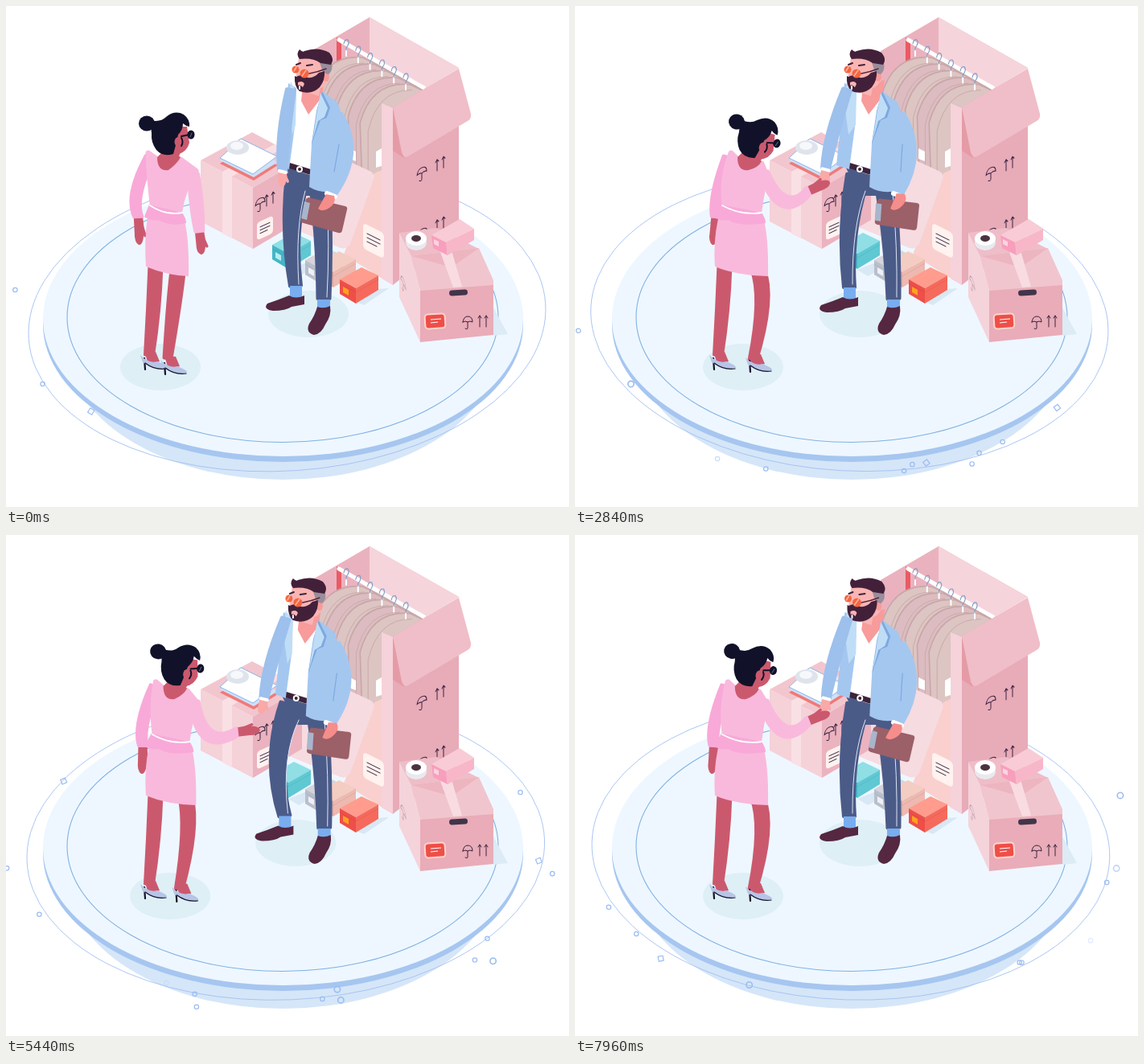
Recreate the animation shown at these times as an HTML page. Size 700 by 623 pixels, loop 8 s.

```html
<!DOCTYPE html>
<html lang="en">
<head>
<meta charset="utf-8">
<title>Handshake</title>
<style>
  html, body { margin: 0; width: 100%; height: 100%; overflow: hidden; background: #fff; }
  svg { display: block; width: 100%; height: 100%; }
  .ink { fill: none; stroke: #3a2440; stroke-width: 1; stroke-linecap: round; stroke-linejoin: round; }
  .thin { fill: none; stroke: #a4c1f2; stroke-width: .9; }
</style>
</head>
<body>
<svg viewBox="0 0 700 623">
  <defs>
    <clipPath id="inside"><path d="M380 56L452 14L563 77L521 103L481 126L467 121V222L380 200Z"/></clipPath>
    <g id="umbrella" class="ink"><path d="M-6 0Q-5-7 0-7Q6-7 6 0Q3-2 0 0Q-3-2-6 0ZM0 0V7Q0 10-3 8"/></g>
    <g id="arrows" class="ink"><path d="M-4 7V-7M-6-4L-4-7L-2-4M4 7V-7M2-4L4-7L6-4"/></g>
  </defs>

  <!-- platform -->
  <ellipse cx="344" cy="420" rx="270" ry="169" fill="#d5e6f8"/>
  <ellipse cx="344.5" cy="396" rx="298.5" ry="171" fill="#a6c6f0"/>
  <ellipse cx="344.5" cy="389" rx="298.5" ry="171" fill="#eef7ff"/>
  <ellipse cx="344" cy="387" rx="268" ry="155.5" fill="none" stroke="#80b1e3" stroke-width="1.1"/>
  <ellipse id="orbit" class="thin" rx="322" ry="186"/>
  <g id="marks" fill="none" stroke="#9bbcf2" stroke-width="1.2"></g>

  <!-- wardrobe box -->
  <path d="M380 56L452 14L563 77L481 126V200H380Z" fill="#eab2be"/>
  <path d="M452 14L563 77L481 126L452 110Z" fill="#f6d4db"/>
  <path d="M411 39L417 42V72L411 75Z" fill="#ea5b64"/>
  <g id="coats" clip-path="url(#inside)"></g>
  <path d="M467 121L481 127V347L420 309L458 208L467 204Z" fill="#f9d0ce"/>
  <path d="M467 121L481 127V347L467 339Z" fill="#f6d2da"/>
  <path d="M481 126L563 78V282L481 347Z" fill="#e8abb8"/>
  <path d="M481 126V180L495 189Z" fill="#e59ba6"/>
  <path d="M481 126L563 78L578 134Q579 140 574 143L500 187Q495 190 492 182Z" fill="#f0bec8"/>
  <path d="M340 232L415 188L452 205Q460 209 457 216L428 296Q424 303 416 301L340 270Z" fill="#f6dbe0"/>
  <g transform="translate(457 292) skewY(27)"><rect x="-13" y="-16" width="26" height="32" rx="5" fill="#fff2ef"/><path class="ink" d="M-8-5H8M-8 0H8M-8 5H4"/></g>
  <path d="M460 181L467 177V199L460 201ZM427 177L435 181V193L427 190Z" fill="#fff"/>
  <use href="#umbrella" transform="translate(517 208) skewY(-25)"/>
  <use href="#arrows" transform="translate(540 196) skewY(-25)"/>
  <use href="#umbrella" transform="translate(518 284) skewY(-25)"/>
  <use href="#arrows" transform="translate(540 271) skewY(-25)"/>

  <!-- left box with folded clothes -->
  <path d="M242 192L306 157L368 190L307 226Z" fill="#f2c6ce"/>
  <path d="M242 192L307 226V302L242 268Z" fill="#f5d1d8"/>
  <path d="M307 226L368 190V266L307 302Z" fill="#ebb3bf"/>
  <path d="M269 206L281 212V289L269 283ZM269 206L334 172L344 177L281 212Z" fill="#f9e0e4"/>
  <path d="M266 196L292 178L338 198L308 217Z" fill="#ef7a78"/>
  <path d="M266 192L292 174L338 194L308 213Z" fill="#cfe0f7"/>
  <path d="M266 189L292 165L337 187L307 209Z" fill="#fff" stroke="#7db0ea" stroke-width=".9"/>
  <ellipse cx="288" cy="176" rx="14" ry="9" fill="#dfe4ec"/><ellipse cx="287" cy="174" rx="8" ry="5" fill="#f7f8fb"/>
  <use href="#umbrella" transform="translate(316 246) skewY(-25)"/>
  <use href="#arrows" transform="translate(328 240) skewY(-25)"/>
  <g transform="translate(322 276) skewY(-25)"><rect x="-10" y="-11" width="20" height="22" rx="4" fill="#fff2ef"/><path class="ink" d="M-6-4H6M-6 0H6M-6 4H3"/></g>

  <!-- shoe boxes -->
  <path d="M351 328L379 317L390 322L364 336ZM438 369L462 352L476 351L445 372Z" fill="#d8e8f4"/>
  <g id="shoeBoxes"></g>

  <!-- right box, tape and parcel -->
  <path d="M606 375L624 408L606 410Z" fill="#dcebf5"/>
  <path d="M489 282L536 276L588 302L504 312Z" fill="#efbdc7"/>
  <path d="M489 282L504 311L515 354V418L489 362Z" fill="#f5d3da"/>
  <path d="M515 353L606 346V409L515 418Z" fill="#e9acb8"/>
  <path d="M504 311L588 301L606 341V347L515 354Z" fill="#f1c5cd"/>
  <path d="M504 311L588 301L554 325Z" fill="#ecb5c0"/>
  <path d="M540 306L554 304L567 349L556 350Z" fill="#f8dce1"/>
  <rect x="551" y="353" width="23" height="7" rx="3.5" fill="#41354a" transform="rotate(-4 562 356)"/>
  <rect x="521" y="383" width="25" height="18" rx="4" fill="#ee4f48" stroke="#ffd4cd" stroke-width="2" transform="rotate(-4 533 392)"/>
  <path d="M528 390L541 389M528 394L537 393" stroke="#fff" stroke-width="1.2"/>
  <use href="#umbrella" x="574" y="393"/><use href="#arrows" x="593" y="392"/>
  <use href="#umbrella" transform="translate(494 346) scale(.55 1) skewY(50)" opacity=".35"/>
  <ellipse cx="510" cy="294" rx="13" ry="10" fill="#e8e9ef"/><ellipse cx="510" cy="289" rx="13" ry="9" fill="#fff"/><ellipse cx="510" cy="289" rx="6" ry="4" fill="#4b3340"/>
  <path d="M529 285L564 265L582 277L547 294Z" fill="#f9cbd6"/>
  <path d="M529 285L547 294L549 310L531 301Z" fill="#f79fbd"/>
  <path d="M547 294L582 277V291L549 310Z" fill="#f7b7c9"/>
  <path d="M532 290L538 293V299L532 296Z" fill="#fbd3df"/>

  <g id="people"></g>
</svg>
<script>
const LOOP = 8000, CYCLE = 4560;
const el = id => document.getElementById(id);
const shape = (d, fill, extra = '') => `<path d="${d}" fill="${fill}" ${extra}/>`;
const line = (d, color, width) =>
  `<path d="${d}" fill="none" stroke="${color}" stroke-width="${width}" stroke-linecap="round" stroke-linejoin="round"/>`;
const oval = (x, y, rx, ry, fill) => `<ellipse cx="${x}" cy="${y}" rx="${rx}" ry="${ry}" fill="${fill}"/>`;
const group = (x, y, turn, content) => `<g transform="translate(${x} ${y}) rotate(${turn})">${content}</g>`;
const mix = (a, b, k) => a + (b - a) * k;
const smooth = k => (k = Math.min(1, Math.max(0, k)), k * k * (3 - 2 * k));
// Rises from 0 to 1 between a and b, falls back between c and d.
const pulse = (t, a, b, c, d) => smooth((t - a) / (b - a)) - smooth((t - c) / (d - c));

// ---- still details ----
let coats = '', hooks = line('M414 42L520 102', '#fff', 5);
for (let i = 0; i < 6; i++) {
  const x = 423 + 14.8 * i, y = 46 + 8.4 * i;
  if (i < 5) coats += shape(`M${x + 20} ${y + 18}Q${x - 28} ${y + 14} ${x - 42} ${y + 66}L${x - 38} ${y + 180}H${x + 90}V${y + 50}Z`,
    i % 2 ? '#dcbcc0' : '#dcc5c2', 'stroke="#c8a6a8" stroke-width="1.6"') +
    line(`M${x + 22} ${y + 25}Q${x - 20} ${y + 24} ${x - 32} ${y + 76}V${y + 180}`, '#cba9ab', 1);
  hooks += line(`M${x} ${y + 9}V${y + 16}`, '#fff', 2) +
    line(`M${x - 3} ${y + 1}Q${x - 2} ${y - 5} ${x + 2} ${y - 4}Q${x + 5} ${y} ${x} ${y + 6}V${y + 9}`, '#7f9cc4', 1.1);
}
el('coats').innerHTML = coats + hooks;

const shoeBox = (x, y, top, left, right, label) => group(x, y, 0,
  shape('M0 0L27-15L48-5L20 11Z', top) + shape('M0 0L20 11V30L0 18Z', left) +
  shape('M20 11L48-5V13L20 30Z', right) + line('M0 5L20 16L48 0', '#0001', 1) + shape('M4 9L11 13V20L4 16Z', label));
el('shoeBoxes').innerHTML =
  shoeBox(331, 297, '#8fdfe5', '#43b6c6', '#5fc8d3', '#b7edf0') +
  shoeBox(372, 316, '#d6d3da', '#b9bfcc', '#c9c5cc', '#eef0f5') +
  shoeBox(387, 320, '#f4cdc2', '#dba9a4', '#edb9b0', '#e2b5ad') +
  shoeBox(415, 340, '#ff9c8d', '#ee4f49', '#f56a5c', '#ffa21c');

// ---- orbiting marks ----
let seed = 11;
const random = (from, to) => mix(from, to, (seed = seed * 16807 % 2147483647) / 2147483647);
const marks = Array.from({ length: 30 }, (_, i) => {
  const birth = i * .27 - .8;
  return { birth, death: birth + random(1.6, 5), angle: random(100, 320), speed: random(24, 30),
    far: random(.95, 1.1), size: i % 6 == 0 ? 0 : i % 3 == 0 ? 4 : 3 };
});

function drawOrbit(t) {
  const sway = 4.5 * Math.cos(2 * Math.PI * t / 4.76);
  el('orbit').setAttribute('transform', `translate(${345 + sway} 392) rotate(${-.88 * sway})`);
  el('marks').innerHTML = marks.map(({ birth, death, angle, speed, far, size }) => {
    const alpha = Math.min(1, (t - birth) / .2, (death - t) / .2);
    if (alpha <= 0) return '';
    const a = (angle + speed * (t - birth)) * Math.PI / 180;
    const x = 345 + 322 * far * Math.cos(a), y = 392 - 186 * far * Math.sin(a);
    return size ? `<circle cx="${x}" cy="${y}" r="${size - .3}" opacity="${alpha}" stroke-width="${size * .4}"/>`
      : `<rect x="-3" y="-3" width="6" height="6" opacity="${alpha}" transform="translate(${x} ${y}) rotate(${30 + 40 * t})"/>`;
  }).join('');
}

// ---- limbs ----
// Middle joint: a share of the way from a to b, pushed sideways.
function joint([ax, ay], [bx, by], share, push) {
  const q = push / Math.hypot(bx - ax, by - ay);
  return [mix(ax, bx, share) - (by - ay) * q, mix(ay, by, share) + (bx - ax) * q];
}

// Tapered limb, curved through its middle joint.
function limb([[x0, y0], [x1, y1], [x2, y2]], widths, fill) {
  const side = s => {
    const at = (x, y, dx, dy, w) => { const q = s * (w - 3) / 2 / Math.hypot(dx, dy); return [x - dy * q, y + dx * q]; };
    const a = at(x0, y0, x1 - x0, y1 - y0, widths[0]), m = at(x1, y1, x2 - x0, y2 - y0, widths[1]),
      b = at(x2, y2, x2 - x1, y2 - y1, widths[2]);
    return [a, m.map((v, i) => 2 * v - (a[i] + b[i]) / 2), b];
  };
  const l = side(1), r = side(-1);
  return shape(`M${l[0]}Q${l[1]} ${l[2]}L${r[2]}Q${r[1]} ${r[0]}Z`, fill, `stroke="${fill}" stroke-width="4" stroke-linejoin="round"`);
}

function arm(shoulder, tip, share, push, palm) {
  const elbow = joint(shoulder, tip, share, push);
  const k = 1 - palm / Math.hypot(tip[0] - elbow[0], tip[1] - elbow[1]);
  return { joints: [shoulder, elbow, [mix(elbow[0], tip[0], k), mix(elbow[1], tip[1], k)]], tip, palm };
}

function hand({ joints, tip, palm }, size, fill) {
  const [x, y] = joints[2], turn = Math.atan2(tip[1] - y, tip[0] - x) * 180 / Math.PI;
  return group(x, y, turn, shape(`M-4 ${-size}L${palm * .45} ${-size - 1}Q${palm + 4} ${-size} ${palm + 3} 1Q${palm} ${size + 1} ${palm * .6} ${size}L-4 ${size}Z`, fill) +
    line(`M${palm * .4} ${1 - size}L${palm * .75} ${-size - 2}`, fill, 3.5));
}

// ---- people: lean moves the upper body, step the feet, reach the greeting hand ----
function drawMan({ lean, step, reach, lift, bob }) {
  const blue = '#a4c7f0', pale = '#c0ddf7', crease = '#7da9df', dark = '#43203a', skin = '#f79b9b', denim = '#4b5b88';
  const head = -21 * lean, chest = -11 * lean, edge = -16 * lean;
  const greet = arm([354 + edge, 104], [343 - 35 * reach, 222 - 3 * reach + bob], .47, 3, 17);
  const wrist = [404 - 3 * lean, 232];
  const holding = [[409 - 8 * lean, 136], [422 - 7 * lean, 183], wrist];
  const hipL = [363 - 11 * step, 211], ankleL = [360 - 19 * step, 348 + 2 * step];
  const kneeL = joint(hipL, ankleL, .5, 6 + 32 * step * (1 - step));
  const hipR = [390 - 4 * step, 222], ankleR = [395 + step, 364], kneeR = joint(hipR, ankleR, .5, -2);

  const legs = shape(`M${347 + edge * .7} 199L${404 + chest * .5} 206V236H${365 + chest}Z`, denim) +
    limb([hipR, kneeR, ankleR], [27, 22, 18], denim) + limb([hipL, kneeL, ankleL], [31, 22, 17], denim) +
    line(`M${hipR[0] + 9} 232Q${kneeR[0] + 8} 300 ${ankleR[0] + 4} 362`, '#dbe4f7', 1) +
    line(`M${hipL[0] + 9} 230Q${kneeL[0] + 4} 275 ${ankleL[0] + 4} 346`, '#dbe4f7', 1);
  const feet = group(ankleL[0], ankleL[1] + 7, 0, shape('M-7-7H8V8H-7Z', '#78adf0') +
      shape('M-8 5Q-20 10-35 15Q-41 22-28 24Q-12 24-5 19L11 16V5Q0 10-8 5Z', '#552741')) +
    group(ankleR[0], 371, 0, shape('M-8-6H8V6H-8Z', '#78adf0') +
      shape('M-8 3Q-11 14-18 24Q-23 35-12 38Q-3 37 2 25Q10 14 8 2Q0 6-8 3Z', '#552741'));
  const torso = group(chest, 0, 0,
    shape('M359 107L394 106L385 170L378 210Q362 206 351 199L356 150Z', '#fff') +
    shape('M369 100L396 92L393 113L376 135L367 118Z', skin) +
    line('M351 198L377 206', '#3d2339', 7) + oval(365, 203, 4, 4, '#fff') + oval(365, 203, 2, 2, '#3d2339') +
    shape('M393 106L412 120Q421 140 419 170L413 229Q394 235 377 225L380 171L386 130Z', blue) +
    shape('M393 106L403 126L399 139L391 142L380 172L387 128Z', crease) +
    shape('M391 108L400 127L396 138L388 143L381 168L387 130Z', pale));
  const front = shape(`M${351 + edge} 96L${361 + chest} 102L${359 + chest} 150L${352 + chest} 203L${341 + edge} 198L${347 + edge} 140Z`, blue) +
    shape(`M${354 + edge} 94L${361 + chest} 107L${360 + chest} 148L${356 + edge} 160L${351 + edge} 122Z`, pale);
  const face = group(head, 0, 0,
    shape('M364 64L400 68L402 90Q398 101 391 102L389 112L376 108L360 92Z', '#f9b5b3') +
    oval(398, 88, 4, 6, skin) +
    shape('M390 70L405 71Q407 80 401 85L394 83Z', '#9b8d9b') +
    shape('M365 66Q360 60 365 54Q369 58 371 56Q388 50 402 58Q409 66 404 73L391 71Q381 64 365 66Z', dark) +
    shape('M359 87Q358 100 365 106Q380 111 390 101Q397 92 396 81L389 83Q383 90 375 89Q367 84 361 88Z', dark) +
    shape('M363 95Q369 92 371 97L369 101Q365 97 363 99Z', '#f9b5b3') +
    line('M365 100V103', '#fff', 2) + line('M361 73L366 71M374 74L381 73', dark, 2) +
    oval(360, 79, 4.5, 4.5, '#f5653f') + oval(371, 84, 5.5, 5.5, '#f5653f') +
    line('M358 81L361 76M368 87L373 80', '#ffb19c', 1.5) + line('M377 84Q388 82 398 78', '#57263f', 1.5));
  const board = group(396 - 2 * lean + 7 * lift, 260 - lift, -7 * lift,
    shape('M-20-22L26-11Q29-10 28-7L22 19Q21 23 17 22L-26 10Q-30 9-29 5L-23-20Z', '#9b6068') +
    shape('M-25-17L-18-15L-22 6L-29 4Z', '#a8b5cc') +
    shape('M2-26L12-24Q15-15 6-9Q-2-3-8-8L-2-19Z', '#f58d8b'));
  const [cuffX, cuffY] = greet.joints[2];
  return legs + feet + torso + front + face + limb(holding, [20, 19, 16], blue) +
    line(`M${holding[1][0] - 8} 172L${wrist[0] + 4} 206`, crease, 1.2) +
    line(`M${wrist[0] - 5} 233L${wrist[0] + 5} 237`, '#fff', 6) + board +
    hand(greet, 5, '#f9a9a8') + limb(greet.joints, [13, 16, 12], '#9dc0ec') +
    line(`M${cuffX - 4} ${cuffY}L${cuffX + 4} ${cuffY + 2}`, '#fff', 4);
}

function drawWoman({ lean, step, reach, swing, bob }) {
  const skin = '#cb596e', pink = '#f9b9dc', shade = '#f8a9d8', ink = '#11122a';
  const rest = arm([179 + 11 * lean, 188], [166 + 6 * lean, 294], .42, 11 - 6 * lean, 32);
  const greet = arm([233 + 2 * lean, 209], [mix(243, 314, swing), mix(306, 220, reach) + bob], .38, mix(0, 30, swing), 26);
  const hipR = [214 + 13 * step, 326], ankleR = [201 + 20 * step, 438 + 3 * step];
  const kneeR = joint(hipR, ankleR, .4, -8 * step);
  const waistL = 179 + 4 * step, waistR = 219 + 13 * step, hem = 227 + 13 * step;
  const neckL = 188 + 14 * lean, neckR = 217 + 15 * lean, neckY = 188 + 5 * lean;

  const shoe = (x, y) => group(x, y, 0, line('M-9-5L-8 9', ink, 2.2) +
    shape('M-9-14L5-13L10-1L-4 3Z', skin) +
    shape('M-14-9Q-4 2 7-1Q20 4 19 7Q8 11-1 6L-11 0Z', '#b8c4e6') + line('M-8 1Q4 10 18 8', ink, 1.2));
  const legs = limb([[186, 322], [183, 378], [178, 434]], [18, 17, 13], skin) +
    limb([hipR, kneeR, ankleR], [19, 18, 12], skin) + shoe(181, 443) + shoe(206 + 20 * step, 449 - 3 * step);
  const rounded = `stroke="${pink}" stroke-width="7" stroke-linejoin="round"`;
  const dress =
    shape(`M${waistL} 247L${waistR} 257Q${hem + 1} 280 ${hem} 336Q200 335 174 324Q171 282 ${waistL} 247Z`, pink) +
    shape(`M${177 + 17 * lean} 183L${neckL} ${191}L${neckR} ${neckY + 3}L${236 + 2 * lean} ${205 + 6 * lean}Q${waistR} 230 ${waistR - 3} 254L${waistL + 3} 246Q${waistL - 1} 214 ${177 + 17 * lean} 183Z`, pink, rounded) +
    shape(`M${waistL - 1} 247L${waistR} 257Q${waistR + 5} 264 ${waistR + 5} 270Q205 275 190 266Q181 268 172 262Z`, shade) +
    line(`M${waistL} 248Q${(waistL + waistR) / 2} 261 ${waistR} 257`, '#fff', 1.8) +
    shape(`M${neckL} 188Q${neckL} 206 ${neckL + 14} 204Q${neckR - 4} ${neckY + 8} ${neckR} ${neckY}L${neckR - 10} ${neckY - 7}L${neckL + 10} 178Z`, skin);
  const head = group(175 + 26 * lean, 146 - 2 * lean, 14 * lean,
    shape('M24 22L42 36L38 46Q28 52 21 46L20 32Z', skin) +
    shape('M34 4L50 4L53 24Q50 35 40 38Q30 39 24 34L32 22Z', skin) +
    shape('M4-4Q17-1 24-8Q35-17 46-11Q54-5 53 4Q48 3 45 0Q45 8 39 14Q37 24 33 38Q20 42 12 33Q5 24 6 12Z', ink) +
    oval(0, 0, 10, 9.5, ink) + oval(39, 23, 4.5, 6, skin) +
    line('M43 16L53 14', ink, 2) + line('M43 18Q46 23 43 28', ink, 2) +
    oval(55, 14, 4.5, 5.5, ink) + line('M54 17L56 12', '#66677a', 1));
  return legs + hand(rest, 5.5, skin) + limb(rest.joints, [14, 15, 13], shade) + dress +
    hand(greet, 5.5, skin) + limb(greet.joints, [15, 17, 13], pink) + head;
}

function draw(now) {
  const ms = now % LOOP, beat = ms % CYCLE;
  const step = pulse(beat, 200, 1250, 3650, 4400), reach = pulse(beat, 150, 1250, 3360, 3800);
  const swing = 1 - (1 - reach) ** 3, lift = pulse(beat, 200, 880, 2900, 3400);
  const bob = 4 * Math.sin(2 * Math.PI * (beat - 1350) / 660) * pulse(beat, 1250, 1450, 2500, 2800);
  drawOrbit(ms / 1000);
  el('people').innerHTML =
    oval(376 - 22 * step, 383, 50, 29, '#deeff6') + oval(192 + 17 * step, 449, 50, 29, '#deeff6') +
    drawMan({ lean: pulse(beat, 500, 1400, 3300, 4400), step, reach, lift, bob }) +
    drawWoman({ lean: pulse(beat, 300, 1400, 3000, 4300), step, reach, swing, bob });
  requestAnimationFrame(draw);
}
requestAnimationFrame(draw);
</script>
</body>
</html>
```
